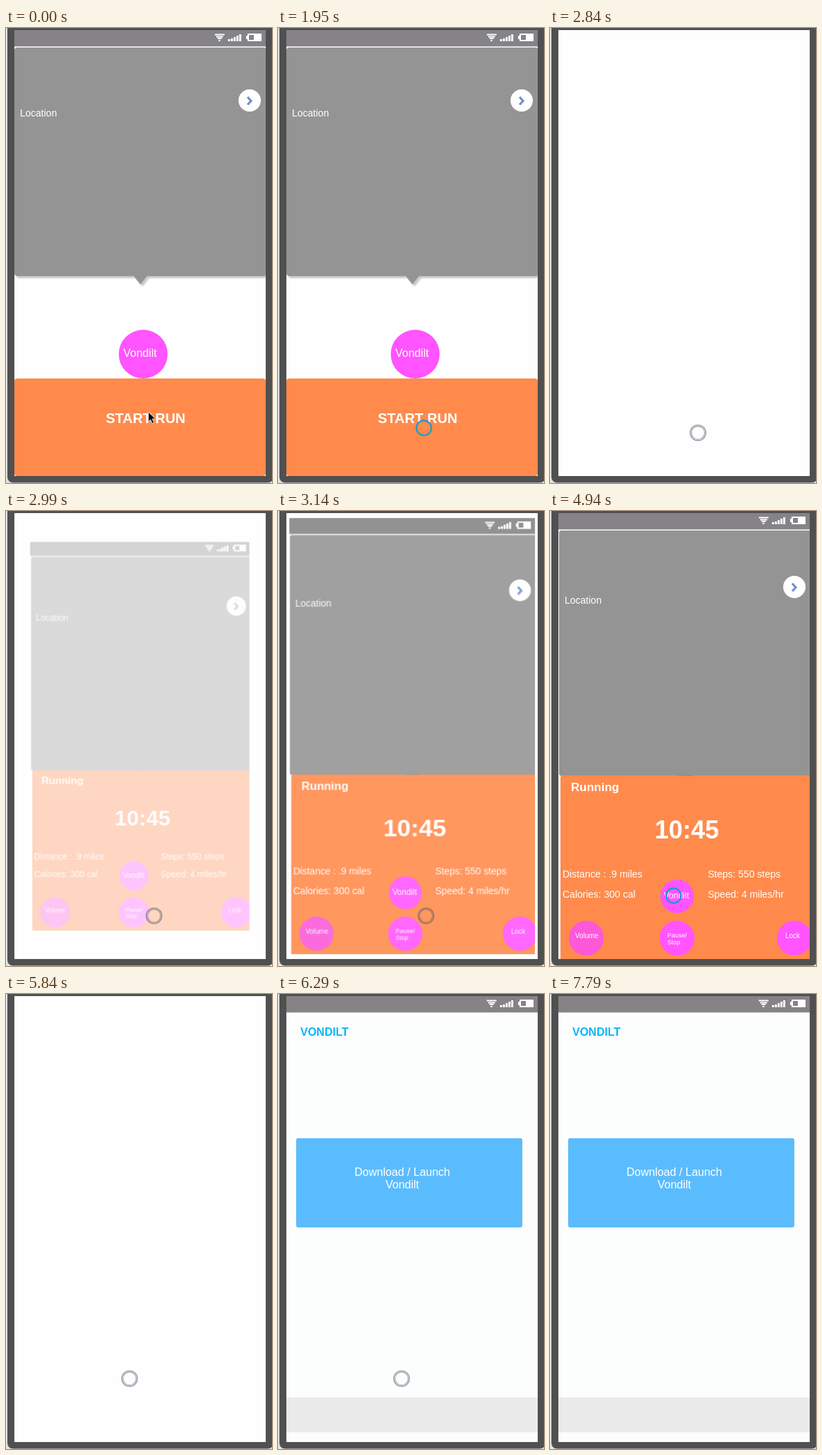
Recreate the animation shown at these times as an HTML page. Size 381 px wide and 653 px high, loop 8540 ms.

```html
<!DOCTYPE html>
<html lang="en">
<head>
<meta charset="utf-8">
<title>Run tracker prototype</title>
<style>
  html, body { margin: 0; width: 100%; height: 100%; overflow: hidden; background: #e2e2e2; }
  svg { display: block; width: 381px; height: 653px; }
  text { font-family: "Liberation Sans", Arial, sans-serif; font-size: 14px; fill: #fff; }
  .bold { font-weight: 700; }
  .mid { text-anchor: middle; }
  .pink { fill: #ff54ff; }
  .orange { fill: #ff8a4b; }
  .panel { fill: #949494; }

  .screen, #cursor, #arrow, #blue, #grey { animation: 8540ms step-end infinite; }
  .screen { transform-origin: 192px 323px; }
  #start { animation-name: start; }
  #running { animation-name: running; opacity: 0; }
  #player { animation-name: player; opacity: 0; }
  #cursor { animation-name: move; }
  #arrow { animation-name: arrow; }
  #blue { animation-name: blue; opacity: 0; }
  #grey { animation-name: grey; opacity: 0; }

  @keyframes start {
    0% { opacity: 1; }
    33.255%, 100% { opacity: 0; }
  }
  /* Screens enter growing from 80% while fading in */
  @keyframes running {
    0% { opacity: 0; transform: scale(.8); }
    35.011% { opacity: .34; transform: scale(.872); }
    36.768% { opacity: .89; transform: scale(.978); }
    38.524% { opacity: 1; transform: none; }
    68.384%, 100% { opacity: 0; transform: none; }
  }
  @keyframes player {
    0% { opacity: 0; transform: scale(.8); }
    70.140% { opacity: .61; transform: scale(.922); }
    71.896% { opacity: .97; transform: scale(.994); }
    73.653%, 100% { opacity: 1; transform: none; }
  }
  @keyframes move {
    0% { transform: translate(204px, 551px); }
    22.833% { transform: translate(209px, 574px); }
    24.590% { transform: translate(212px, 581px); }
    56.088% { transform: translate(192px, 570px); }
    57.845% { transform: translate(177px, 552px); }
    85.948% { transform: translate(239px, 574px); }
    87.704% { transform: translate(319px, 627px); }
    89.461%, 100% { transform: translate(336px, 649px); }
  }
  @keyframes arrow {
    0% { opacity: 1; }
    22.833% { opacity: 0; }
    89.461% { opacity: 1; }
    91.217%, 100% { opacity: 0; }
  }
  @keyframes blue {
    0% { opacity: 0; }
    22.833% { opacity: 1; }
    33.255% { opacity: 0; }
    56.088% { opacity: 1; }
    68.384%, 100% { opacity: 0; }
  }
  @keyframes grey {
    0% { opacity: 0; }
    33.255% { opacity: 1; }
    56.088% { opacity: 0; }
    68.384% { opacity: 1; }
    89.461%, 100% { opacity: 0; }
  }
</style>
</head>
<body>
<svg viewBox="0 0 381 653">
  <defs>
    <clipPath id="view"><rect x="12" y="3" width="360" height="640"/></clipPath>
    <filter id="shadow" x="-5%" y="-5%" width="110%" height="112%">
      <feDropShadow dx="3" dy="3" stdDeviation="1" flood-color="#000" flood-opacity=".22"/>
    </filter>
    <g id="status">
      <rect x="12" y="3" width="360" height="23.5" fill="#858387"/>
      <path d="M299 9.5h14M301 12.5h10M303 15h6M304.500 18h2.500" stroke="#fff" stroke-width="1.8"/>
      <path d="M319.500 19v-3M323.500 19v-4M327.500 19v-6M331.500 19v-8M335.500 19v-10" stroke="#fff" stroke-width="3"/>
      <path d="M346 8h20v11h-20v-3h-2v-5h2z" fill="#fff"/>
      <rect x="348" y="10" width="7" height="7" fill="#858387"/>
    </g>
    <g id="next">
      <circle r="16" fill="#fff"/>
      <path d="M-3-5 2 .800-3 6" fill="none" stroke="#7191cd" stroke-width="3.2"/>
    </g>
  </defs>

  <rect x="2" y="-20" width="381" height="672.500" rx="8" fill="#505050"/>
  <rect x="12" y="3" width="360" height="640" fill="#fefefe"/>

  <g clip-path="url(#view)">
    <g class="screen" id="start">
      <use href="#status"/>
      <g class="panel" filter="url(#shadow)">
        <rect x="12" y="28" width="361" height="328" rx="4"/>
        <path d="M182 355h21l-10.500 13z"/>
      </g>
      <text x="20" y="127">Location</text>
      <use href="#next" x="349" y="104"/>
      <circle class="pink" cx="196.500" cy="468" r="35"/>
      <text x="168" y="472" style="font-size:16px">Vondilt</text>
      <rect class="orange" x="12" y="503" width="360" height="140" rx="4"/>
      <text class="bold mid" x="200" y="567" style="font-size:20px">START RUN</text>
    </g>

    <g class="screen" id="running">
      <g clip-path="url(#view)">
        <use href="#status"/>
        <rect class="panel" x="13" y="28" width="364" height="352" rx="3"/>
        <text x="21" y="133">Location</text>
        <use href="#next" x="350" y="109"/>
        <rect class="orange" x="15" y="379.500" width="362" height="270" rx="3"/>
        <path d="M183 379.500h21" stroke="#8c8c8c"/>
        <text class="bold" x="30" y="402" style="font-size:17px">Running</text>
        <text class="bold mid" x="196" y="470" style="font-size:36px">10:45</text>
        <text x="18" y="526">Distance : .9 miles</text>
        <text x="18" y="555">Calories: 300 cal</text>
        <text x="226" y="526">Steps: 550 steps</text>
        <text x="226" y="555">Speed: 4 miles/hr</text>
        <g class="pink">
          <circle cx="182" cy="553" r="24"/>
          <circle cx="52" cy="613" r="25" fill="#fb58da"/>
          <circle cx="182" cy="613" r="25"/>
          <circle cx="350" cy="613" r="25"/>
        </g>
        <text x="163" y="556" style="font-size:12px">Vondilt</text>
        <text x="36" y="613" style="font-size:10px">Volume</text>
        <text style="font-size:9px"><tspan x="168" y="612">Pause/</tspan><tspan x="168" y="622">Stop</tspan></text>
        <text x="337" y="613" style="font-size:10px">Lock</text>
      </g>
    </g>

    <g class="screen" id="player">
      <rect x="12" y="3" width="360" height="640" fill="#fcfefd"/>
      <use href="#status"/>
      <text class="bold" x="32" y="60" style="font-size:16px;fill:#08b4f9">VONDILT</text>
      <rect x="26" y="207" width="324" height="128" rx="3" fill="#5bbcfd"/>
      <text class="mid" style="font-size:16px"><tspan x="178" y="261">Download / Launch</tspan><tspan x="178" y="279">Vondilt</tspan></text>
      <rect x="12" y="579" width="360" height="50" fill="#eaeaea"/>
    </g>
  </g>

  <g id="cursor">
    <path id="arrow" d="M0 0v14l3-3 2.500 5.500 2.500-1-2.500-5.500h4.500z" stroke="#fff" stroke-width=".8"/>
    <circle id="blue" r="10.700" fill="none" stroke="#1b9ad1" stroke-width="2.200"/>
    <g id="grey" fill="none" stroke="#4a5568" stroke-width="1.300">
      <circle r="11.200" stroke-opacity=".6"/>
      <circle r="9.400" stroke-opacity=".5"/>
    </g>
  </g>
</svg>
</body>
</html>
```
